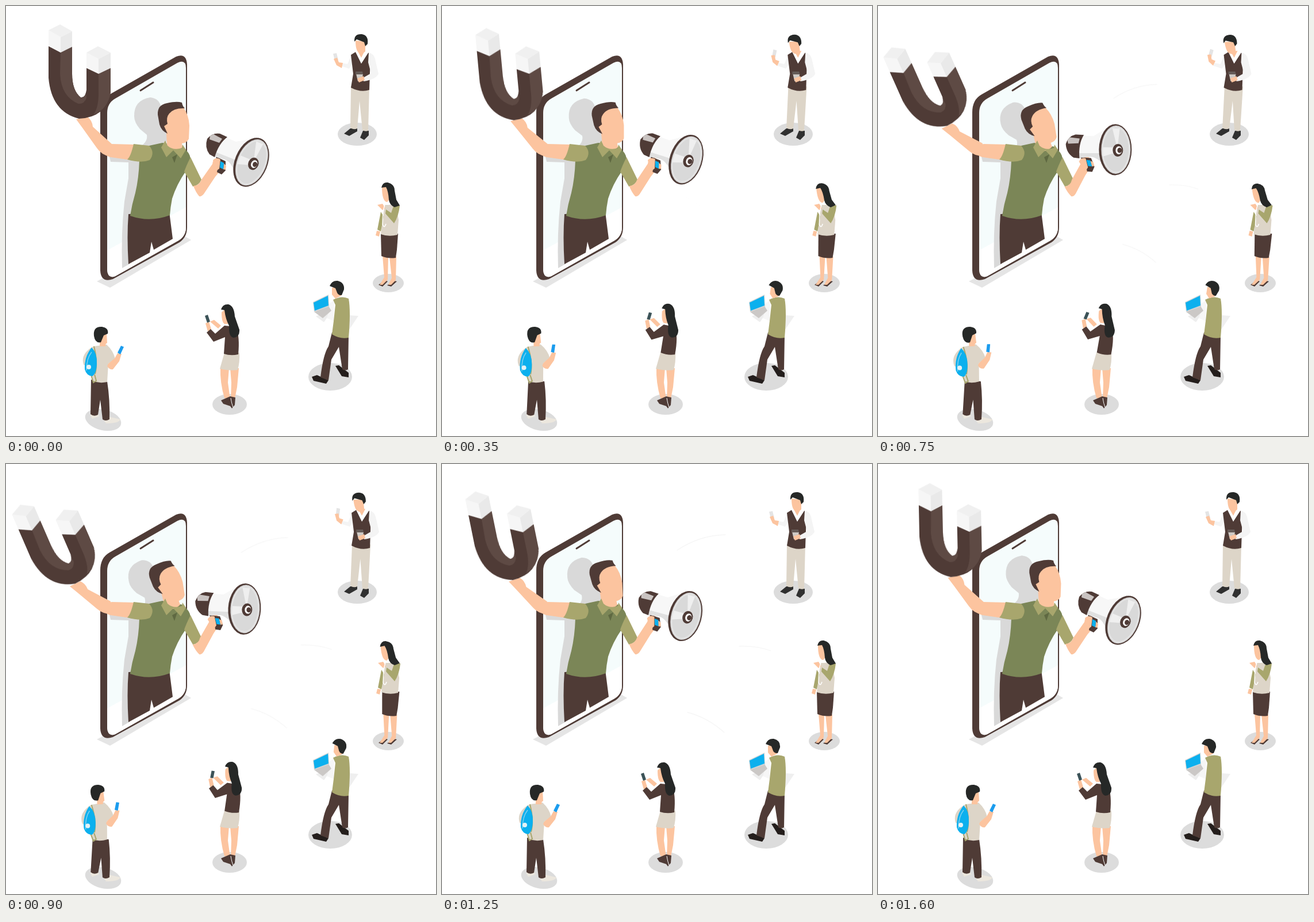
Write an HTML page without scripts that moves like this. It is 748x748 px and loops after 1650 ms.

```html
<!DOCTYPE html>
<html lang="en">
<head>
<meta charset="utf-8">
<title>Attracting an audience</title>
<style>
  @property --k { syntax: '<number>'; inherits: true; initial-value: 0; }
  html, body { margin: 0; width: 100%; height: 100%; overflow: hidden; background: #fff; }
  svg { display: block; width: 100%; height: 100%; }

  .dark { fill: #4f3b36; } .mid { fill: #5e4a44; }
  .skin { fill: #fcc49f; } .hair { fill: #262827; }
  .green { fill: #7b8657; } .olive { fill: #a8a66d; }
  .beige { fill: #ddd5c8; } .blue { fill: #0cb0ee; }
  .pale { fill: #f6f6f6; } .grey { fill: #d9d9d9; } .floor { fill: #dcdcdc; }

  /* --k runs 0..1 per rig; each part scales it by its own turn, shift or skew */
  .pull { animation: pull 1.65s linear infinite; }
  .call { animation: call 1.65s linear infinite; }
  .nod  { animation: nod 1.65s linear infinite; }
  .late { animation-name: late; }
  .part {
    transform-origin: var(--o);
    transform: translate(calc(var(--k) * var(--x, 0px)), calc(var(--k) * var(--y, 0px)))
               rotate(calc(var(--k) * var(--a, 0deg)))
               skewX(calc(var(--k) * var(--s, 0deg)));
  }
  .waves {
    fill: none; stroke: #f6f6f6; stroke-width: 1.3; stroke-linecap: round;
    transform-origin: 415px 258px; animation: spread 1.65s linear infinite;
  }

  @keyframes pull {
    0%, 4% { --k: 0; } 12% { --k: .05; } 21.2% { --k: .22; } 30.3% { --k: .52; }
    39% { --k: .84; } 45.5% { --k: 1; } 51.5% { --k: 1; } 57% { --k: .96; }
    63.6% { --k: .87; } 75.8% { --k: .48; } 85% { --k: .22; } 97% { --k: .05; } 100% { --k: 0; }
  }
  @keyframes call {
    0%, 6% { --k: 0; } 14% { --k: .06; } 21.2% { --k: .19; } 30.3% { --k: .5; }
    39% { --k: .83; } 45.5% { --k: 1; } 49% { --k: 1; } 56% { --k: .85; }
    63.6% { --k: .59; } 75.8% { --k: .31; } 88% { --k: .1; } 97%, 100% { --k: 0; }
  }
  @keyframes nod {
    0%, 3% { --k: 0; } 12% { --k: .4; } 21.2% { --k: .85; } 30.3%, 46% { --k: 1; }
    55% { --k: .7; } 63.6% { --k: .28; } 73%, 100% { --k: 0; }
  }
  @keyframes late {
    0%, 3% { --k: 0; } 21.2% { --k: .75; } 30.3%, 50% { --k: 1; }
    63.6% { --k: .85; } 75%, 100% { --k: 0; }
  }
  @keyframes spread {
    0%, 20% { transform: scale(.4); opacity: 0; } 30.3% { transform: scale(.62); opacity: .8; }
    45.5% { transform: scale(.9); opacity: 1; }
    60%, 78% { transform: none; opacity: 1; } 88%, 100% { transform: none; opacity: 0; }
  }
</style>
</head>
<body>
<svg viewBox="0 0 748 748" role="img" aria-label="Man leaning out of a phone with a magnet and a megaphone, surrounded by people">

  <g class="waves">
    <path d="M409 150Q448 124 493 123"/>
    <path d="M517 317Q548 316 572 325"/>
    <path d="M427 432Q462 441 491 467"/>
  </g>

  <!-- phone -->
  <path fill="#e5e5e5" d="M158 479L181 490L322 407L310 400Z"/>
  <path class="dark" d="M164 185Q164 163 180 154L296 88Q314 81 315 102V385Q315 402 302 411L186 475Q165 482 164 460Z"/>
  <path fill="#f5fcfc" d="M176 186Q176 169 190 161L298 99Q313 92 313 108V385Q313 400 300 408L190 470Q177 475 176 459Z"/>
  <path fill="#fff" d="M176 425L313 350V385Q313 400 300 408L190 470Q177 475 176 459Z"/>
  <path stroke="#4f3b36" stroke-width="3" stroke-linecap="round" d="M234 147L256 133"/>

  <!-- man -->
  <g class="pull">
    <path class="grey" d="M180 262L240 262L236 310L216 370V448L202 456Q200 395 206 340L213 300V272L182 271Z"/>
    <path class="grey part" style="--a:-10.5deg;--o:290px 250px" d="M223 192Q222 164 251 159Q268 161 270 178L282 225L276 250L234 244Q247 236 245 224L233 214Q223 202 223 192Z"/>

    <path class="dark" d="M213 362L284 358L290 405L257 424L253 410L250 429L213 449Q210 400 213 362Z"/>
    <path class="skin" d="M224 241L184 240Q166 243 168 254Q174 261 182 263L217 268Z"/>
    <path class="skin part" style="--a:-15deg;--o:178px 248px" d="M122 197L142 193Q150 199 151 210L184 240L181 262Q166 259 158 247L133 212Z"/>
    <path class="green" d="M249 243L272 238L308 245Q320 256 321 265L313 287Q297 310 289 335Q286 350 285 364Q250 377 216 365Q219 345 225 325Q231 300 232 268Z"/>
    <path class="olive" d="M222 240L249 243Q260 255 250 268Q235 274 211 267Q217 262 222 240Z"/>
    <path class="olive" d="M321 263L340 302Q336 312 325 314L310 288Q313 279 321 263Z"/>
    <g class="part" style="--a:-11.5deg;--x:-3px;--y:2px;--o:290px 250px">
      <path class="skin" d="M274 190Q282 176 309 177Q318 190 319 208L318 231Q315 238 306 239L307 246Q293 256 280 245L279 221Q270 212 274 190Z"/>
      <path class="dark" d="M264 189Q263 172 280 169Q297 165 306 168Q307 174 311 178Q292 177 284 187Q278 194 281 205L275 209L281 222Q270 217 267 206Z"/>
    </g>
    <path class="olive" d="M277 234L270 246L279 263L291 251L304 265L313 250L307 241L306 247Q291 252 281 243Z"/>
    <path fill="#5f6942" d="M289 263L298 258L293 273Z"/>
  </g>

  <!-- magnet -->
  <g class="pull"><g class="part" style="--a:-24deg;--x:-6px;--o:156px 204px">
    <path class="dark" d="M74 69V125Q79 184 127 196Q174 194 182 150V107L161 117L140 107V146Q138 160 130 159Q115 147 115 118V70L95 80Z"/>
    <path class="mid" d="M95 80L115 70V118Q115 147 130 159Q137 161 139 151L140 160Q136 171 126 170Q96 158 94 118Z"/>
    <path class="mid" d="M161 117L182 107V150Q178 179 152 189Q161 177 161 152Z"/>
    <path class="pale" d="M74 42L95 54V81L74 70Z"/>
    <path fill="#e9e9e9" d="M115 44L95 54V81L115 71Z"/>
    <path fill="#f0f0f0" d="M74 42L94 32L115 44L95 54Z"/>
    <path class="pale" d="M140 81L161 92V118L140 108Z"/>
    <path fill="#e9e9e9" d="M182 81L161 92V118L182 108Z"/>
    <path fill="#f0f0f0" d="M140 81L160 70L182 81L161 92Z"/>
  </g></g>

  <!-- megaphone and its arm -->
  <g class="call">
    <path class="skin part" style="--a:-6deg;--o:338px 328px" d="M326 313Q337 312 340 302L359 275Q360 265 371 264L378 271L374 285L364 297L344 327Q340 332 336 331Q330 324 326 313Z"/>
    <g class="part" style="--a:-21.5deg;--o:362px 297px">
      <path class="dark" d="M365 262L382 270L382 286L375 293L367 289L369 277Z"/>
      <path fill="#f7f7f7" d="M375 225L400 236L428 231L398 288Q392 274 383 268L361 261Z"/>
      <path fill="#e0e0e0" d="M362 253L405 270L397 286Q391 272 383 268L360 261Z"/>
      <path class="dark" d="M350 231Q359 220 372 222L385 228Q370 239 363 263L354 258Q345 246 350 231Z"/>
      <path fill="#c9c3c1" d="M355 226L361 223L376 231L371 238L354 232Z"/>
      <path class="skin" d="M360 268Q366 262 373 267L371 283L364 288ZM379 274L383 278L382 285L378 284Z"/>
      <path class="blue" d="M373 270L379 273L378 284L372 281Z"/>
      <g transform="rotate(22 427 272)">
        <ellipse class="dark" cx="426.500" cy="272" rx="28.500" ry="44.500"/>
        <ellipse class="grey" cx="427.500" cy="272" rx="25.500" ry="42"/>
        <ellipse fill="none" stroke="#ececec" cx="427.500" cy="272" rx="23" ry="39"/>
        <path fill="#efefef" d="M405 268L424 268V278L405 284ZM421 235L434 235L431 262H428Z"/>
        <ellipse class="dark" cx="431" cy="273" rx="9" ry="11"/>
        <ellipse fill="#fff" cx="432.500" cy="273" rx="5.500" ry="7"/>
        <ellipse class="dark" cx="434" cy="273" rx="4" ry="4.500"/>
      </g>
    </g>
  </g>

  <!-- man with coffee -->
  <g class="nod">
    <ellipse class="floor" cx="611" cy="223" rx="34" ry="20"/>
    <path fill="#303030" d="M588 222L599 213L611 212L611 218L597 226ZM616 229L621 217L631 217V225L623 233Z"/>
    <path class="beige part" style="--s:-2.2deg;--o:610px 215px" d="M600 140H632L631 180L630 217Q625 219 620 216L615 165L611 213Q605 216 599 212Z"/>
    <g class="part" style="--x:1.5px">
      <path fill="#f4f4f4" d="M602 83L606 95L597 109L582 104L584 99L594 101Z"/>
      <path class="dark" d="M600 85L608 80L618 100L630 81L634 85L632 146Q617 151 600 142L604 118Z"/>
      <path fill="#fff" d="M608 79L618 100L631 80Z"/>
      <path class="skin" d="M612 79L624 78L618 90Z"/>
      <path fill="#f4f4f4" d="M631 81Q640 83 642 92L648 118Q643 128 622 131L621 125L635 117L630 98Z"/>
      <path fill="#cfcac5" d="M609 118H621L619 131H612Z"/>
      <path fill="#655b57" d="M608 114H620L621 119H608Z"/>
      <path class="skin" d="M611 126L622 122L624 129L614 133Z"/>
    </g>
    <g class="part" style="--a:13deg;--y:-1px;--o:598px 102px">
      <path fill="#e4e4e4" class="part" style="--a:16deg;--o:575px 95px" d="M569 83L575 82L578 94L572 95Z"/>
      <path class="skin" d="M570 92L576 90L579 98L586 99L584 108L575 103Z"/>
    </g>
    <g class="part" style="--a:-8deg;--x:-2px;--y:1px;--o:617px 83px">
      <path class="skin" d="M608 60L625 62V79Q619 85 614 81Q608 78 608 60Z"/>
      <path class="hair" d="M606 62Q605 48 619 49Q631 51 629 66L625 70L623 63L610 58Z"/>
    </g>
  </g>

  <!-- woman in skirt -->
  <g class="nod">
    <ellipse class="floor" cx="665" cy="482" rx="27" ry="16"/>
    <path class="dark" d="M648 485L659 477L664 479L655 488ZM663 486L674 478L680 479L670 488Z"/>
    <g class="part" style="--s:-2.2deg;--o:665px 482px">
      <path class="skin" d="M655 434L665 436L664 476L655 485L650 485L658 472ZM667 436H679L678 477L670 485L665 485L671 473Z"/>
      <path class="dark" d="M652 396H682L680 424L678 438Q665 440 653 435Z"/>
    </g>
    <g class="part" style="--x:1.5px">
      <path class="beige" d="M659 346L678 346L683 372L681 398Q666 402 652 397L655 370Z"/>
      <path class="olive" d="M652 358L646 389L652 392L657 366ZM675 345L685 347Q683 366 675 378L660 361L661 354L670 360Z"/>
      <path class="skin" d="M645 391L651 392L649 401L643 399ZM646 346L655 344L660 352L655 355Z"/>
      <path fill="none" stroke="#fff" stroke-width="1.500" d="M660 341L656 357L655 380Q658 388 661 379"/>
    </g>
    <g class="part" style="--a:-6deg;--y:1px;--o:668px 348px">
      <path class="skin" d="M654 315L664 312L668 335L663 341Q654 340 654 315Z"/>
      <path class="hair" d="M653 316Q655 306 664 307Q676 310 676 321L679 337L685 347L676 350Q667 346 666 337Q665 322 661 315Z"/>
    </g>
  </g>

  <!-- man with laptop -->
  <g class="nod">
    <ellipse class="floor" cx="564" cy="645" rx="38" ry="24"/>
    <path fill="#efefef" d="M598 538L613 539L597 563Z"/>
    <path fill="#241e1c" d="M532 645L541 642L561 651L557 657L535 652ZM573 626L579 625L596 638V646L584 644Z"/>
    <path class="dark" d="M567 568L596 573L595 632Q590 635 585 632L579 593L566 615L561 651L547 646Q552 605 561 592Z"/>
    <path class="pale" d="M571 511L561 519L556 542L570 548Z"/>
    <path class="olive" d="M569 511Q584 503 596 509Q600 530 596 577Q581 580 567 571L570 548L573 520Z"/>
    <path fill="#eee" d="M539 540L553 550L558 543L563 528Z"/>
    <path fill="#cbc8c6" d="M536 532L561 522L566 530L551 543Z"/>
    <path fill="#d0d4d6" d="M534 515L561 502L562 523L536 532Z"/>
    <path class="blue" d="M535 516L560 504L561 521L537 530Z"/>
    <g class="part" style="--a:9deg;--x:3px;--o:576px 508px">
      <path class="skin" d="M567 490L578 489L583 504L573 509L567 502Z"/>
      <path class="hair" d="M563 487Q567 477 577 478Q589 481 588 493L584 503Q577 504 575 496L573 491Z"/>
    </g>
  </g>

  <!-- woman taking a picture -->
  <g class="nod">
    <ellipse class="floor" cx="389" cy="693" rx="30" ry="18"/>
    <path class="skin" d="M373 629H388L386 655L390 684L380 682Q372 655 373 629ZM390 630H405L402 663L397 688L391 686L392 655Z"/>
    <path class="dark" d="M374 686L390 679L399 681L398 694L393 700L390 696L378 692Z"/>
    <path stroke="#fff" d="M391 682Q392 690 395 698"/>
    <path class="beige" d="M380 603H406Q407 619 403 633Q388 635 372 631Z"/>
    <g class="part" style="--a:6deg;--x:1.5px;--y:-1px;--o:391px 606px">
      <path class="skin" d="M347 552L353 549L357 562L351 566ZM355 549L362 546L374 556L369 561Z"/>
      <path fill="#3c5358" class="part" style="--a:35deg;--x:2px;--o:351px 547px" d="M346 539L351 537L355 549L350 551Z"/>
      <path class="dark" d="M380 556L400 558Q407 575 404 606Q391 609 379 605L381 576L361 584L349 568L356 562L364 570Z"/>
      <path class="skin" d="M375 533L382 526L386 553L380 553Q375 550 375 533Z"/>
      <path class="hair" d="M374 528Q377 518 387 519Q397 522 398 540L406 563Q407 576 396 577Q387 576 388 556Q382 545 380 529Z"/>
    </g>
  </g>

  <!-- boy with backpack -->
  <g class="nod late">
    <ellipse class="floor" cx="169" cy="720" rx="32" ry="18" transform="rotate(14 169 720)"/>
    <path fill="#ece7de" d="M146 711L160 709L162 714L150 718ZM168 718L181 715L199 719Q197 726 174 726Z"/>
    <path class="dark part" style="--s:-2.5deg;--o:165px 718px" d="M148 650L176 653Q181 685 180 719Q173 723 168 719L164 685L160 711Q153 715 147 710Z"/>
    <g class="part" style="--a:-4.1deg;--o:165px 655px">
      <path class="beige" d="M152 592L175 589Q187 600 190 614L178 622L176 654Q162 657 150 652L147 630L135 624Q129 605 152 592Z"/>
      <path class="skin" d="M178 622L189 613L194 604L201 605L197 618L186 632Q179 633 176 626ZM163 580L174 583L173 592L163 592Z"/>
      <g class="nod">
        <path fill="#1b9cee" class="part" style="--a:-16deg;--x:-3px;--y:-1px;--o:199px 600px" d="M194 603L200 591L205 593L199 606Z"/>
      </g>
      <path fill="none" stroke="#a8a66d" stroke-width="2" d="M153 592Q160 620 155 640M148 642L152 655L157 652L154 641"/>
      <path class="blue" d="M149 594Q159 604 158 623Q157 640 150 644Q140 643 137 632Q136 610 149 594Z"/>
      <path fill="none" stroke="#7fd0ef" stroke-width="1.500" d="M149 602Q140 613 140 634"/>
      <circle fill="#e4f2f6" cx="144" cy="628" r="4"/>
      <path class="skin" d="M165 571L175 568L176 586Q170 592 164 587Z"/>
      <path class="hair" d="M153 574Q151 557 167 558Q179 560 177 570L170 573L165 585Q155 587 153 574Z"/>
    </g>
  </g>
</svg>
</body>
</html>
```
